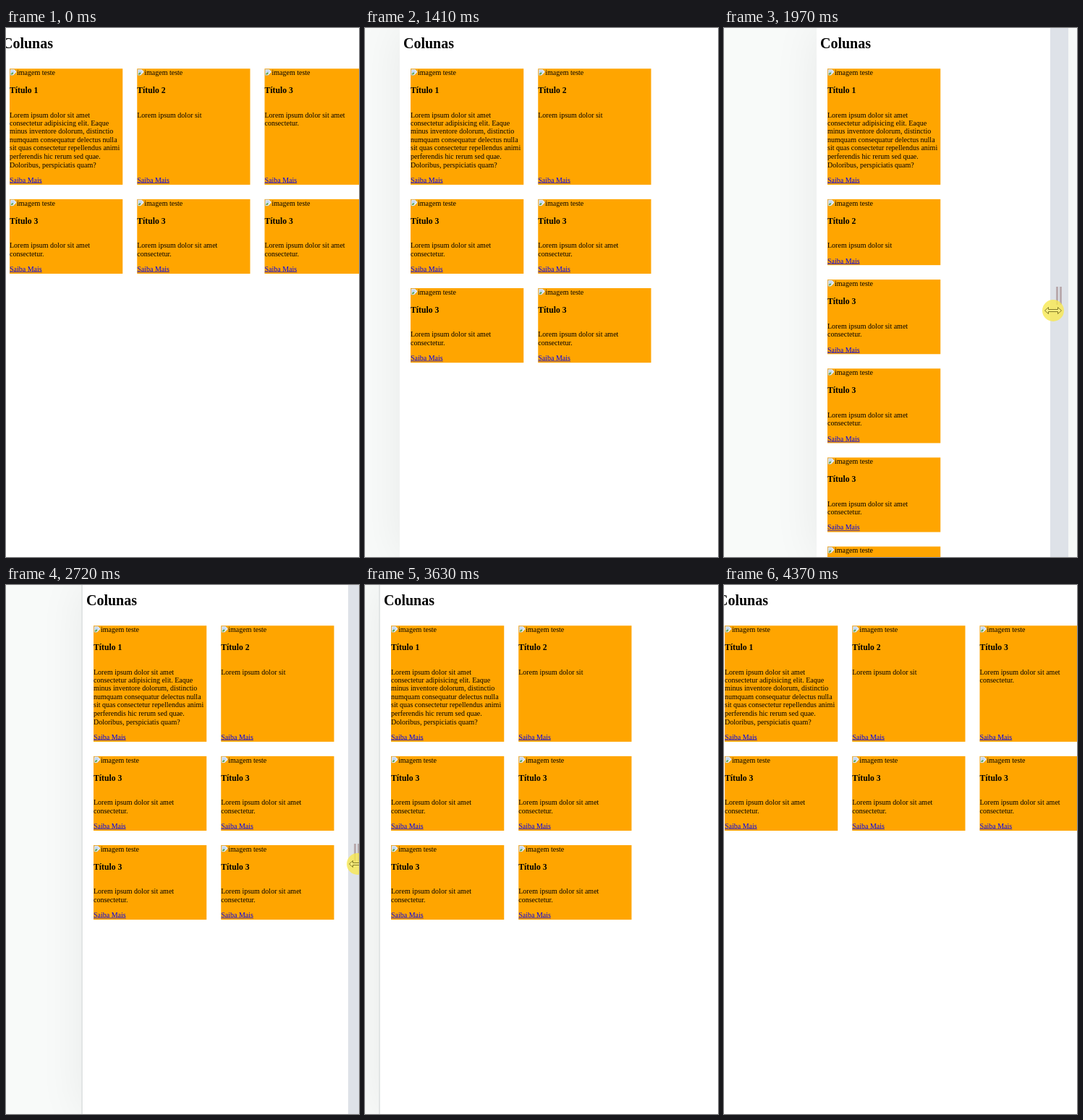
Animation, 488 px wide and 732 px high, one loop 5820 ms. Source, as an HTML page:

```html
<!DOCTYPE html>
<html lang="pt">
<head>
<meta charset="utf-8">
<title>Colunas</title>
<style>
html, body { margin: 0; width: 100%; height: 100%; overflow: hidden; background: #f8faf9; }
body { position: relative; }

/* The panel stays centred in a frame wider than the stage */
.frame { position: absolute; top: 0; left: 0; width: 579px; height: 732px; }
.panel {
  position: absolute; inset: 0 -10px; background: #fff;
  box-shadow: 0 0 60px rgba(0, 0, 0, .07);
  animation: resize 5820ms infinite;
}
.edge {
  position: absolute; top: 0; bottom: 0; left: -2px; width: 2px; background: #e2e5e5;
  animation: edge 5820ms step-end infinite;
}
.grip { position: absolute; top: 0; bottom: 0; left: 100%; width: 25px; background: #dee2e8; }
.grip::before {
  content: ""; position: absolute; left: 8px; top: 358px; width: 2px; height: 25px;
  border: solid #b9abae; border-width: 0 3px;
}

/* The page is laid out at full size and shown zoomed out */
.page {
  position: absolute; left: 0; top: 0; width: 160%; height: 160%;
  transform: scale(.625); transform-origin: 0 0;
  font: 16px/18.4px "Liberation Serif", "Times New Roman", serif; color: #000; white-space: nowrap;
}
h1 { position: absolute; left: 8px; top: 16px; margin: 0; font-size: 32px; line-height: 36.8px; }
.cards { position: absolute; top: 74px; left: 8px; right: 8px; display: flex; flex-wrap: wrap; }
.card { display: flex; flex-direction: column; flex: none; width: 250px; margin: 16px; background: orange; }
.alt { padding-left: 16px; position: relative; }
.alt svg { position: absolute; left: 0; top: 0; width: 16px; height: 16px; }
h3 { margin: 18.72px 0; font-size: 18.72px; line-height: 21.76px; }
p { margin: 16px 0; flex: 1; }
a { color: #00e; text-decoration: underline; }
.cursor {
  position: absolute; left: -15px; top: -15px; width: 30px; height: 30px;
  transform: translate(545px, 391px);
  animation: drag 5820ms infinite;
}

@keyframes resize {
  0%      { inset: 0 -10px; animation-timing-function: step-end; }
  15.979% { inset: 0 -2px;  animation-timing-function: steps(7); }
  24.226% { inset: 0 48px;  animation-timing-function: step-end; }
  25.429% { inset: 0 60px;  animation-timing-function: steps(7); }
  33.848% { inset: 0 128px; animation-timing-function: steps(2); }
  36.254% { inset: 0 136px; animation-timing-function: step-end; }
  41.924% { inset: 0 131px; animation-timing-function: steps(4); }
  46.735% { inset: 0 106px; animation-timing-function: steps(4); }
  51.374% { inset: 0 78px;  animation-timing-function: steps(9); }
  62.371% { inset: 0 21px;  animation-timing-function: steps(5); }
  68.384% { inset: 0 -9px;  animation-timing-function: step-end; }
  72.852% { inset: 0 -11px; animation-timing-function: steps(2); }
  75.085%, 100% { inset: 0 -14px; }
}
@keyframes drag {
  0%      { transform: translate(545px, 391px); animation-timing-function: step-end; }
  25.429% { transform: translate(530px, 391px); animation-timing-function: steps(7); }
  33.848% { transform: translate(455px, 391px); animation-timing-function: steps(2); }
  36.254% { transform: translate(446px, 391px); animation-timing-function: step-end; }
  41.924% { transform: translate(453px, 390px); animation-timing-function: steps(4); }
  46.735% { transform: translate(486px, 386px); animation-timing-function: steps(4); }
  51.374%, 100% { transform: translate(522px, 386px); }
}
@keyframes edge {
  0% { opacity: 0; }
  41.924%, 100% { opacity: 1; }
}
</style>
</head>
<body>
<div class="frame">
  <div class="panel">
    <div class="edge"></div>
    <div class="page">
      <h1>Colunas</h1>
      <div class="cards"></div>
    </div>
    <div class="grip"></div>
  </div>
</div>
<svg class="cursor" viewBox="-15 -15 30 30">
  <circle r="15" fill="#f8e850" fill-opacity=".8"/>
  <path d="M-11.5 0L-6.500 -4.500V-1.500H6.500V-4.500L11.5 0L6.500 4.500V1.500H-6.500V4.500Z" fill="#f9ee80" stroke="#756c1c" stroke-width=".9"/>
</svg>
<script>
const icon = `<svg viewBox="0 0 16 16">
  <path d="M1.5 1.5H10L14.5 6V8L8 14.5H1.5Z" fill="#fff" stroke="#a9b0b8"/>
  <path d="M3 3H9.5L12.5 7L6 13H3Z" fill="#c3d9f5"/>
  <path d="M3 13V11L6 8L9 10L6 13Z" fill="#62a84f"/>
</svg>`;
const short = "Lorem ipsum dolor sit amet<br>consectetur.";
const long = ["Lorem ipsum dolor sit amet", "consectetur adipisicing elit. Eaque",
  "minus inventore dolorum, distinctio", "numquam consequatur delectus nulla",
  "sit quas consectetur repellendus animi", "perferendis hic rerum sed quae.",
  "Doloribus, perspiciatis quam?"].join("<br>");
const card = (n, text) => `<div class="card">
  <div class="alt">${icon}imagem teste</div>
  <h3>Título ${n}</h3><p>${text}</p><a>Saiba Mais</a>
</div>`;
document.querySelector(".cards").innerHTML =
  card(1, long) + card(2, "Lorem ipsum dolor sit") + card(3, short).repeat(4);
</script>
</body>
</html>
```
